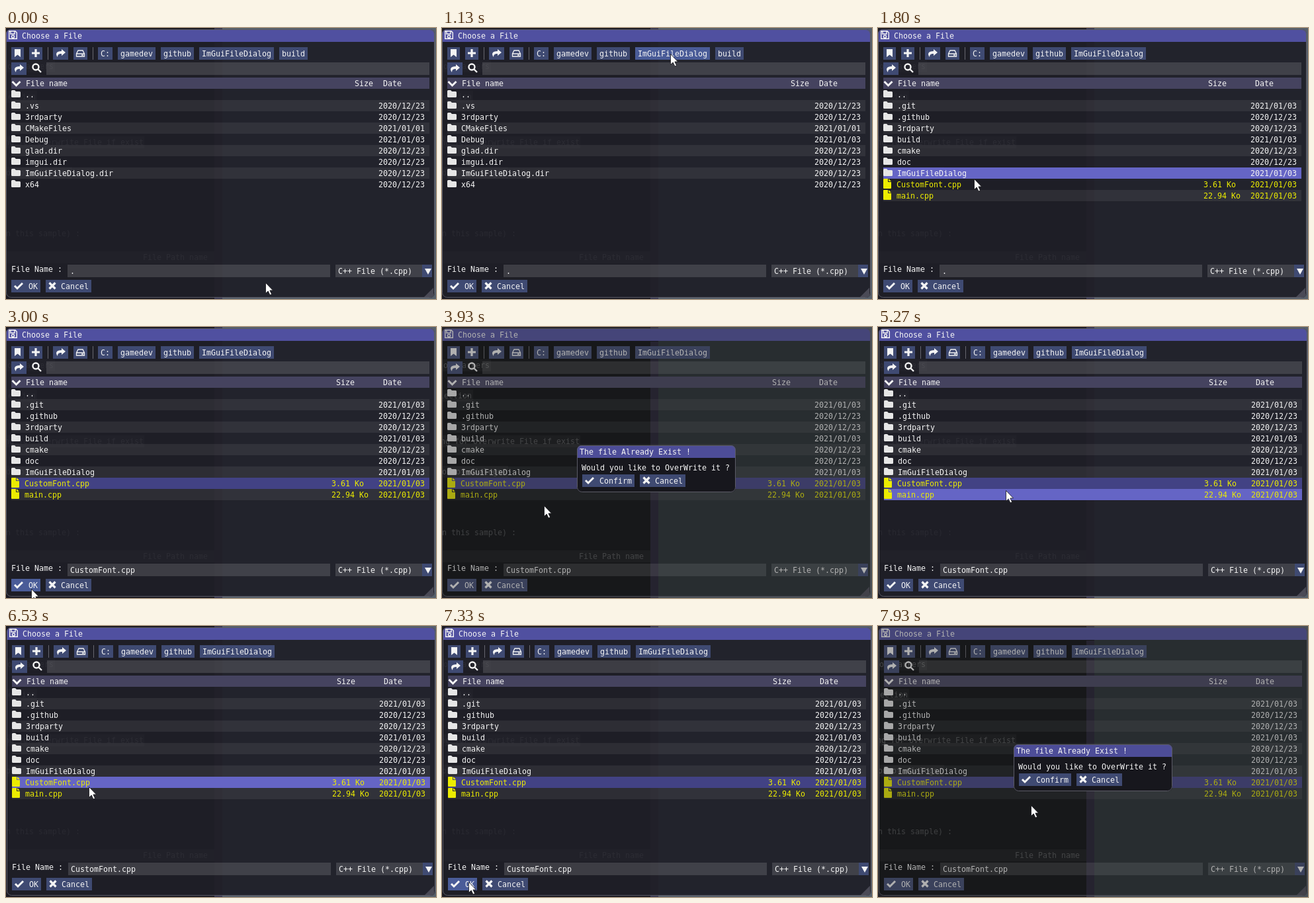
An HTML page with a canvas for the animation above (8 s loop, 650 by 410 pixels).

```html
<!DOCTYPE html>
<html lang="en">
<head>
<meta charset="utf-8">
<title>Choose a File</title>
<style>
html, body { margin: 0; width: 100%; height: 100%; overflow: hidden; background: #1b1a22; }
canvas { display: block; }
</style>
</head>
<body>
<canvas id="stage" width="650" height="410"></canvas>
<script>
const ctx = document.getElementById('stage').getContext('2d');
const STEP = 200 / 3, LOOP = 120; // 15 steps per second, 8 s
const SPLIT = 327;                // edge of the panel behind the dialog
const WHITE = '#f4f4f4', YELLOW = '#ecec00', BUTTON = '#3f4a72', HOVER = '#4a5c98';
const FIELD = 'rgba(255,255,255,.138)';

// Pointer path: step, x, y
const path = [
  [0, 392, 385], [5, 300, 345], [9, 247, 290], [10, 255, 250], [11, 300, 72], [13, 330, 42],
  [17, 345, 39], [23, 345, 39], [26, 153, 217], [27, 145, 228], [32, 105, 236], [39, 105, 236],
  [43, 48, 370], [45, 38, 396], [52, 36, 392], [55, 36, 392], [59, 154, 270], [65, 310, 236],
  [68, 330, 233], [71, 330, 233], [79, 193, 247], [84, 111, 237], [86, 106, 237], [92, 106, 237],
  [98, 125, 243], [99, 125, 243], [106, 50, 375], [110, 40, 387], [112, 40, 387],
  [119, 231, 271], [120, 236, 269]
];

const buildDir = [
  ['.vs', '2020/12/23'], ['3rdparty', '2020/12/23'], ['CMakeFiles', '2021/01/01'],
  ['Debug', '2021/01/03'], ['glad.dir', '2020/12/23'], ['imgui.dir', '2020/12/23'],
  ['ImGuiFileDialog.dir', '2020/12/23'], ['x64', '2020/12/23']
];
const projectDir = [
  ['.git', '2021/01/03'], ['.github', '2020/12/23'], ['3rdparty', '2020/12/23'],
  ['build', '2021/01/03'], ['cmake', '2020/12/23'], ['doc', '2020/12/23'],
  ['ImGuiFileDialog', '2021/01/03'], ['CustomFont.cpp', '2021/01/03', '3.61 Ko'],
  ['main.cpp', '2021/01/03', '22.94 Ko']
];

let mouse;

function pointer(k) {
  k = Math.max(0, k);
  const i = path.findIndex((p, n) => n && k <= p[0]);
  const [k0, x0, y0] = path[i - 1], [k1, x1, y1] = path[i];
  const f = (k - k0) / (k1 - k0);
  return { x: Math.round(x0 + (x1 - x0) * f), y: Math.round(y0 + (y1 - y0) * f) };
}

const over = (x, y, w, h) =>
  mouse.x >= x && mouse.x < x + w && mouse.y >= y && mouse.y < y + h;

function rect(x, y, w, h, color) {
  ctx.fillStyle = color;
  ctx.fillRect(x, y, w, h);
}

function text(s, x, cy, color = WHITE) {
  ctx.fillStyle = color;
  ctx.fillText(s, x, cy + 4);
}

function shape(d, x, y, color = WHITE, stroke = 0) {
  ctx.save();
  ctx.translate(x, y);
  const p = new Path2D(d);
  if (stroke) {
    ctx.strokeStyle = color;
    ctx.lineWidth = stroke;
    ctx.stroke(p);
  } else {
    ctx.fillStyle = color;
    ctx.fill(p, 'evenodd');
  }
  ctx.restore();
}

const icon = {
  check: (x, y) => shape('M1 6L5 10L13 2', x, y, WHITE, 3),
  cross: (x, y) => shape('M1.5 1.5L10.5 10.5M10.5 1.5L1.5 10.5', x, y, WHITE, 3.2),
  share: (x, y) => shape('M9 0L15 5L9 10V7C5 7 3 8 3 12C-1 7 1 3 9 3Z', x, y),
  folder: (x, y) => shape('M0 1.5Q0 0 1.5 0H5L7 2H12.5Q14 2 14 3.5V9.5Q14 11 12.5 11H1.5Q0 11 0 9.5Z', x, y, '#e6e6e6'),
  file: (x, y) => shape('M1 0H7V5H12V14Q12 15 11 15H1Q0 15 0 14V1Q0 0 1 0ZM8 0L12 4H8Z', x, y, YELLOW)
};

function button(x, y, w, label, pad = 4, draw) {
  rect(x, y, w, 19, over(x, y, w, 19) ? HOVER : BUTTON);
  if (label) text(label, x + pad, y + 10);
  if (draw) draw(x + 4, y + 3);
}

function backdrop() {
  rect(0, 0, SPLIT, 410, '#1b1a22');
  rect(315, 0, 12, 410, '#3a3a52');
  rect(SPLIT, 0, 323, 410, '#565f6a');
}

// The panel behind, showing faintly through the dialog
function ghosts(dim) {
  const box = `rgba(255,255,255,${dim ? 0.035 : 0.01})`;
  const ink = `rgba(255,255,255,${dim ? 0.25 : 0.05})`;
  const label = (s, x, cy) => text(s, x, cy, ink);
  rect(0, 338, 315, 18, box);
  rect(315, 22, 12, 385, dim ? '#1f1c2e' : '#212029');
  rect(0, 49, 74, 18, box);
  rect(0, 95, 47, 18, box);
  rect(0, 164, 209, 18, box);
  rect(0, 210, 100, 18, box);
  label('of markers', 2, 58);
  label('?', 55, 81);
  label('lection', -4, 104);
  label('ng for overwrite File if exist', -2, 173);
  label('on of dialogs', 0, 219);
  label('n this sample) :', 0, 311);
  label('File Path name', 207, 347);
}

function toolbar(inBuild) {
  button(8, 29, 19);
  shape('M0 0H9V12L4.5 8.5L0 12Z', 13, 32);
  button(35, 29, 20);
  shape('M6 0V12M0 6H12', 39, 32, WHITE, 3.2);
  button(71, 29, 23, '', 0, icon.share);
  button(102, 29, 21);
  shape('M3 1H10L12.5 6V10H.5V6ZM.5 6H12.5M8 8H11', 106, 33, WHITE, 1.3);
  for (const x of [63, 131]) rect(x, 29, 1, 19, '#66666f');
  let x = 139;
  for (const name of ['C:', 'gamedev', 'github', 'ImGuiFileDialog', ...(inBuild ? ['build'] : [])]) {
    const w = name.length * 7 + 8;
    button(x, 29, w, name);
    x += w + 8;
  }
  button(8, 52, 23, '', 0, icon.share);
  shape('M9.5 5A4.5 4.5 0 1 1 .5 5A4.5 4.5 0 1 1 9.5 5M8.5 8.5L13 13', 40, 54, WHITE, 2.4);
  rect(61, 52, 579, 19, FIELD);
}

function fileList(k, inBuild, dim) {
  rect(8, 75, 632, 17, '#45435f');
  shape('M1 1L7 7L13 1', 8.5, 80, WHITE, 3);
  text('File name', 30, 84);
  text('Size', inBuild ? 527 : 499, 84);
  text('Date', 570, 84);
  const pressed = (k >= 35 && k < 38) || (k >= 93 && k < 96);
  [['..', ''], ...(inBuild ? buildDir : projectDir)].forEach(([name, date, size], i) => {
    const y = 92 + 17 * i, cy = y + 9;
    if (i % 2) rect(8, y, 632, 17, 'rgba(255,255,255,.065)');
    if (!dim && over(8, y, 632, 17)) rect(8, y, 632, 17, pressed ? '#6a6acb' : '#6565c5');
    else if (i === 8 && k >= 36) rect(8, y, 632, 17, '#424284');
    const color = size ? YELLOW : WHITE;
    if (size) icon.file(8, y);
    else icon.folder(8, y + 2);
    text(name, size ? 28 : 29, cy, color);
    if (size) text(size, 492, cy, color);
    text(date, 563, cy, color);
  });
}

function footer(name) {
  text('File Name :', 8, 365);
  rect(93, 358, 397, 19, FIELD);
  text(name, 97, 368);
  rect(498, 358, 131, 19, FIELD);
  text('C++ File (*.cpp)', 502, 368);
  rect(629, 358, 15, 19, BUTTON);
  shape('M0 0H10L5 9Z', 633, 364);
  button(8, 381, 44, 'OK', 26, icon.check);
  button(60, 381, 69, 'Cancel', 23, icon.cross);
  shape('M14 0V10Q14 14 10 14H0Z', 632, 393, '#4a4a56');
}

function frame(x, y, w, h, body, title) {
  ctx.save();
  ctx.beginPath();
  ctx.roundRect(x, y, w, h, 7);
  ctx.clip();
  body();
  rect(x, y, w, 19, title);
  ctx.restore();
  ctx.strokeStyle = '#5b5b66';
  ctx.lineWidth = 1;
  ctx.beginPath();
  ctx.roundRect(x + 0.5, y + 0.5, w - 1, h - 1, 7);
  ctx.stroke();
}

function popup() {
  frame(204, 179, 240, 71, () => rect(204, 179, 240, 71, '#17171d'), '#4d4d98');
  text('The file Already Exist !', 208, 189);
  text('Would you like to OverWrite it ?', 211, 213);
  button(212, 223, 79, 'Confirm', 26, icon.check);
  button(299, 223, 69, 'Cancel', 23, icon.cross);
}

function render(k) {
  const dim = (k >= 53 && k < 72) || k >= 113;
  const inBuild = k < 19, shift = k >= 72 ? 1 : 0;
  const tip = pointer(k);
  mouse = pointer(k - 1); // hover trails the pointer by one step
  ctx.font = '11.63px "DejaVu Sans Mono", monospace';
  backdrop();
  ctx.save();
  ctx.translate(shift, 0);
  frame(0, 2, 648, 406, () => {
    rect(0, 2, SPLIT - shift, 406, dim ? '#090b0e' : '#1e1e26');
    rect(SPLIT - shift, 2, 323, 406, dim ? '#232b30' : '#22232c');
    ctx.translate(-shift, 0);
    ghosts(dim);
    ctx.translate(shift, 0);
  }, '#5050a0');
  shape('M.7 .7H10L12.3 3V12.3H.7ZM3 1V5H9V1M8.5 9A2 2 0 1 1 4.5 9A2 2 0 1 1 8.5 9', 4, 4, WHITE, 1.4);
  text('Choose a File', 24, 12);
  toolbar(inBuild);
  fileList(k, inBuild, dim);
  footer(k < 36 ? '.' : 'CustomFont.cpp');
  if (dim) {
    rect(-1, 0, 652, 410, 'rgba(51,51,51,.35)');
    popup();
  }
  ctx.restore();
  const arrow = 'M.5 .5V16.5L4.2 13L7 19L9.6 17.8L6.9 12H11.5Z';
  shape(arrow, tip.x, tip.y, '#ffffff');
  shape(arrow, tip.x, tip.y, '#15151a', 0.8);
}

function tick() {
  // small lead absorbs rounding at step boundaries
  render(Math.floor((performance.now() + 4) / STEP) % LOOP);
  requestAnimationFrame(tick);
}
tick();
</script>
</body>
</html>
```
